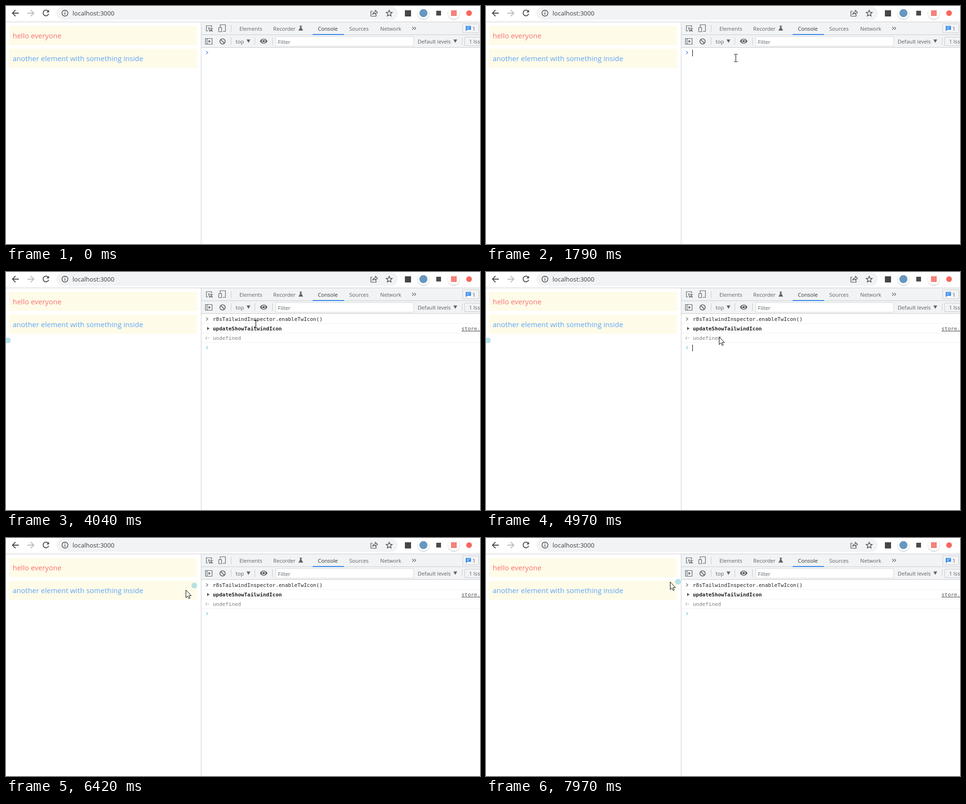
An HTML page that plays this animation: 997x501 px, repeating every 8000 ms.

```html
<!DOCTYPE html>
<html lang="en">
<head>
<meta charset="utf-8">
<title>Console demo</title>
<style>
html, body { margin: 0; width: 100%; height: 100%; overflow: hidden; background: #fff; }
svg { display: block; width: 997px; height: 501px; }
text { font-family: "Open Sans", "Noto Sans", sans-serif; }
.ui { font-size: 11.15px; fill: #5f6368; }
.page { font-size: 15px; }
.code text { font: 10.96px "DejaVu Sans Mono", "Liberation Mono", monospace; fill: #222; }
.code .bold { font-weight: bold; }
.code .dim { fill: #808080; }
.line { fill: none; stroke: #5f6368; stroke-width: 1.4; }
.rule { fill: none; stroke: #cacdd1; shape-rendering: crispEdges; }

/* One 8 s loop: 1 % = 80 ms. The small lead keeps changes off the frame edges. */
.anim { animation: 8s step-end -5ms infinite; }

#pointer { animation-name: move; }
@keyframes move {
  0%      { transform: translate(657px, 478px); opacity: 0; }
  6.625%  { transform: translate(657px, 478px); opacity: 1; animation-timing-function: steps(3); }
  9.583%  { transform: translate(607px, 318px); animation-timing-function: steps(3); }
  12.542% { transform: translate(546px, 182px); animation-timing-function: steps(3); }
  15.5%   { transform: translate(518px, 112px); }
  16.5%   { transform: translate(518px, 108px); }
  17.625% { transform: translate(516px, 105px); }
  19.375% { transform: translate(519px, 106px); animation-timing-function: steps(3); }
  22.375% { transform: translate(525px, 109px); }
  61.125% { transform: translate(523px, 113px); }
  62.125% { transform: translate(490px, 136px); animation-timing-function: steps(2); }
  64.375% { transform: translate(432px, 172px); animation-timing-function: steps(2); }
  66.625% { transform: translate(402px, 179px); animation-timing-function: steps(4); }
  70.625% { transform: translate(388px, 148px); animation-timing-function: steps(4); }
  74.5%   { transform: translate(375px, 114px); }
  79.25%  { transform: translate(376px, 111px); }
  80.25%  { transform: translate(378px, 109px); }
  85%     { transform: translate(370px, 110px); animation-timing-function: steps(3); }
  87.875% { transform: translate(329px, 112px); animation-timing-function: steps(3); }
  90.75%  { transform: translate(366px, 99px); animation-timing-function: steps(4); }
  94.875% { transform: translate(384px, 94px); }
  95.75%  { transform: translate(383px, 93px); }
  96.75%  { transform: translate(385px, 92px); }
  99.625%, 100% { transform: translate(387px, 92px); opacity: 1; }
}
#arrow { animation-name: arrow; }
@keyframes arrow { 0%, 61.125%, 100% { opacity: 1; } 16.5% { opacity: 0; } }
#beam { animation-name: beam; }
@keyframes beam { 0%, 61.125%, 100% { opacity: 0; } 16.5% { opacity: 1; } }

#caret { animation-name: caret; }
@keyframes caret {
  0% { transform: translate(434px, 92px); opacity: 0; }
  20.375% { opacity: 1; }
  27.25% { opacity: 0; }
  32% { transform: translate(665px, 92px); opacity: 1; }
  38.75% { opacity: 0; }
  44.625% { transform: translate(434px, 153px); opacity: 1; }
  50.5% { opacity: 0; }
  58.125% { opacity: 1; }
  64.75% { opacity: 0; }
  71.625% { opacity: 1; }
  79.25% { opacity: 0; }
  86% { opacity: 1; }
  95.75%, 100% { transform: translate(434px, 153px); opacity: 0; }
}

#badge { animation-name: badge; }
@keyframes badge {
  0% { transform: translate(4px, 144px); opacity: 0; }
  44.625% { transform: translate(4px, 144px); opacity: .45; }
  66.625% { transform: translate(404px, 40px); }
  73.5% { transform: translate(396px, 100px); }
  95.75%, 100% { transform: translate(404px, 92px); opacity: .45; }
}

#empty { animation-name: empty; }
@keyframes empty { 0% { opacity: 1; } 32%, 100% { opacity: 0; } }
#typed { animation-name: typed; }
@keyframes typed { 0%, 43.5%, 100% { opacity: 0; } 32% { opacity: 1; } }
#log { animation-name: log; }
@keyframes log { 0% { opacity: 0; } 43.5%, 100% { opacity: 1; } }
#result { animation-name: result; }
@keyframes result { 0% { opacity: 0; } 44.625%, 100% { opacity: 1; } }
</style>
</head>
<body>
<svg viewBox="0 0 997 501">
  <defs>
    <path id="chevron" d="M-2-3.2 1.5 0-2 3.2" fill="none" stroke-width="1.4"/>
    <path id="down" d="M-4-3.5h8L0 3.5z" fill="#5f6368"/>
    <clipPath id="view"><path d="M0 34h410v467H0z"/></clipPath>
    <filter id="soft" x="-30%" y="-30%" width="160%" height="160%">
      <feDropShadow dx="0" dy="1" stdDeviation="1" flood-opacity=".3"/>
    </filter>
  </defs>

  <!-- browser bar -->
  <path d="M0 33.5h997" class="rule" stroke="#dadce0"/>
  <rect x="106" y="1" width="718" height="28" rx="14" fill="#f1f3f4"/>
  <g fill="none" stroke="#46494d" stroke-width="1.8">
    <path d="M27 15H14M20 8.5 13.5 15l6.500 6.500"/>
    <path d="M45 15h13M52 8.500 58.500 15 52 21.500" stroke="#b9bbbe"/>
    <path d="M88.600 10.600A6 6 0 1 0 89.800 16.500"/>
    <path d="M90.500 8v5.500H85z" fill="#46494d" stroke="none"/>
    <g stroke-width="1.4">
      <circle cx="124" cy="15" r="6.300"/>
      <path d="M124 14v4.500M124 11v1.600"/>
      <path d="M771 11h-3.500v10.500h11V18M771 18c.5-4 3-6 6-6V9l4.500 4.500L777 17.500v-2.700c-2.500 0-4.500 1-6 3.200z" stroke-width="1.200"/>
      <path d="M806 9l1.800 4.200 4.500.4-3.400 3 1 4.400-3.900-2.300-3.900 2.300 1-4.400-3.400-3 4.500-.4z"/>
    </g>
  </g>
  <text x="140" y="20" font-size="13.05" fill="#3c4043">localhost:3000</text>

  <rect x="839" y="9" width="13" height="13" fill="#454648"/>
  <g fill="#fff" filter="url(#soft)">
    <circle cx="878" cy="15" r="12"/>
    <circle cx="942" cy="15" r="12"/>
  </g>
  <circle cx="878" cy="15" r="8.500" fill="#6697bf"/>
  <rect x="905" y="10" width="10" height="10" fill="#4a4a4a"/>
  <rect x="936" y="9" width="12" height="12" fill="#f5827a"/>
  <circle cx="974" cy="15" r="6" fill="#f9665e"/>

  <!-- page -->
  <path d="M6 42h396v40H6zM6 90h396v40H6z" fill="#fefbe8"/>
  <text class="page" x="14" y="68" fill="#f87171">hello everyone</text>
  <text class="page" x="14" y="116" fill="#60a5fa">another element with something inside</text>
  <g clip-path="url(#view)">
    <circle id="badge" class="anim" r="6" fill="#5cc0d4"/>
  </g>

  <!-- developer tools -->
  <path d="M411 34h586v53H411z" fill="#f1f3f4"/>
  <path class="rule" d="M410.500 34v467M411 60.500h586M411 87.500h586M473.500 40v15M473.500 66v16M523.500 66v16M560.500 66v16M959.500 66v16"/>
  <path d="M645 59h66v2h-66z" fill="#3187e8"/>

  <g class="line">
    <path d="M425 52.500h-3.500v-11h11v4M426 46l2.500 7.500 1.600-3 3 3 1.100-1.100-3-3 3-1.600z" stroke-width="1.200"/>
    <path d="M450.500 46v-6.500h11v14H456M447.500 45.500h6v8.500h-6z" stroke-width="1.200"/>
    <path d="M419.500 68.500h14v12h-14zM423 68.500v12" stroke-width="1.200"/>
    <path d="M426 71.500v6l4.500-3z" fill="#5f6368" stroke="none"/>
    <circle cx="455.500" cy="74.500" r="5.500" stroke-width="1.700"/>
    <path d="m451.700 70.700 7.600 7.600" stroke-width="1.700"/>
    <path d="M854.500 44l3 3-3 3M859 44l3 3-3 3" stroke-width="1.200"/>
  </g>
  <path d="M617.500 41.500h5v1.200h-1v3l3.500 6h-10l3.500-6v-3h-1z" fill="#5f6368"/>
  <path d="M534 74c3.500-7 12.500-7 16 0-3.500 7-12.500 7-16 0z" fill="#5f6368"/>
  <circle cx="542" cy="74" r="3.200" fill="#5f6368" stroke="#f1f3f4" stroke-width="1.400"/>

  <g class="ui">
    <text x="491" y="52">Elements</text>
    <text x="562" y="52">Recorder</text>
    <text x="656" y="52" fill="#303236">Console</text>
    <text x="722" y="52">Sources</text>
    <text x="787" y="52">Network</text>
    <text x="483" y="79">top</text>
    <text x="866" y="79">Default levels</text>
  </g>
  <use href="#down" x="510" y="74"/>
  <use href="#down" x="945" y="74"/>
  <rect x="567.500" y="64.500" width="290" height="20" fill="#fff" stroke="#d7dade"/>
  <text class="ui" x="572" y="80">Filter</text>
  <rect x="960.500" y="37.500" width="34" height="19" rx="2" class="rule"/>
  <path d="M967 42h11v8h-8l-3 3z" fill="#3187e8"/>
  <path d="M969 44.500h7M969 47.500h5" stroke="#fff"/>
  <text class="ui" x="981" y="52">1</text>
  <rect x="964.500" y="65.500" width="60" height="18" rx="2" class="rule"/>
  <text class="ui" x="974" y="79">1 Issue</text>

  <!-- console -->
  <g class="code">
    <use id="empty" class="anim" href="#chevron" x="423" y="98" stroke="#5b93ea"/>
    <g id="typed" class="anim">
      <use href="#chevron" x="423" y="98" stroke="#1f7ad2"/>
      <path d="M653 93h13v13h-13z" fill="#e9efef"/>
      <path d="M653 106.500h13" stroke="#8d9494" shape-rendering="crispEdges"/>
      <text x="435" y="103">r8sTailwindInspector.enableTwIcon()</text>
    </g>
    <g id="log" class="anim">
      <path class="rule" d="M411 108.500h586M411 128.500h586" style="stroke:#f0f0f0"/>
      <use href="#chevron" x="423" y="99" stroke="#777"/>
      <text x="435" y="103">r8sTailwindInspector.enableTwIcon()</text>
      <path d="M423 115.500v7l5-3.500z" fill="#5a5a5a"/>
      <text class="bold" x="435" y="123">updateShowTailwindIcon</text>
      <text x="958" y="123" text-decoration="underline" style="fill:#545454">store.ts:12</text>
    </g>
    <g id="result" class="anim">
      <path class="rule" d="M411 148.500h586" style="stroke:#f0f0f0"/>
      <path d="M423 136l-3 3 3 3M425 139h2" fill="none" stroke="#b2b2b2" stroke-width="1.300"/>
      <text class="dim" x="435" y="143">undefined</text>
      <use href="#chevron" x="423" y="159" stroke="#92cbdf"/>
    </g>
  </g>
  <rect id="caret" class="anim" width="1" height="14" fill="#000"/>

  <g id="pointer" class="anim">
    <path id="arrow" class="anim" d="M.5.5v16.200l3.700-3.500 2.500 5.300 2.400-1-2.400-5.200h4.800z" fill="#fff" stroke="#000"/>
    <path id="beam" class="anim" d="M-3-7.500h3M1-7.500h3M-3 8.500h3M1 8.500h3M.5-7v15" fill="none" stroke="#000" shape-rendering="crispEdges"/>
  </g>
</svg>
</body>
</html>
```
